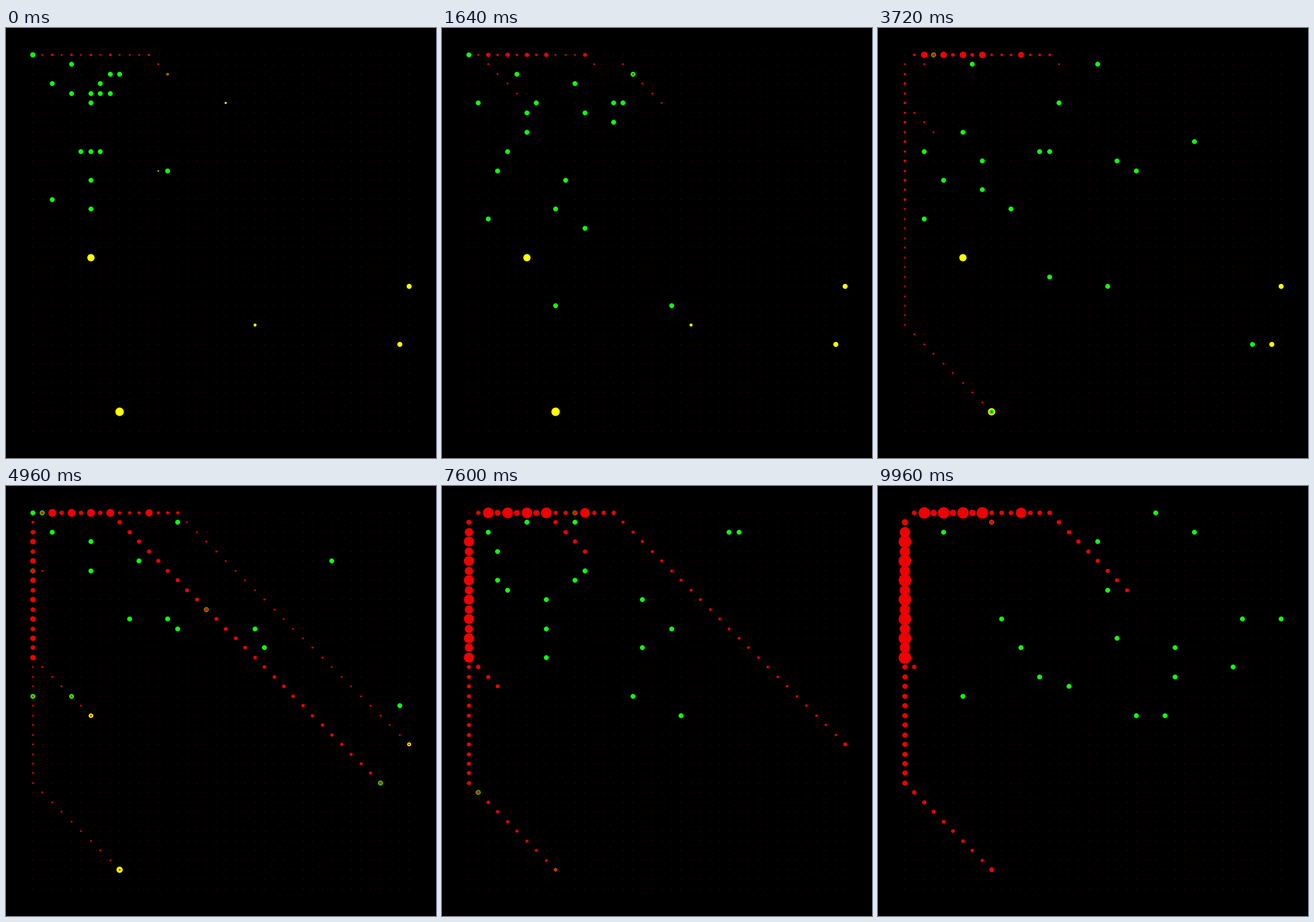
A matplotlib script that plays this animation: 600x600 px, repeating every 10 s.

```python
import matplotlib.pyplot as plt
import numpy as np
from matplotlib.animation import FuncAnimation

SIZE, DPI = 600, 100
N = 40                      # cells per side
FRAMES, INTERVAL = 250, 40
SPEED = 2                   # cells per frame for ants on an errand
LEAD = 8                    # frames an ant needs to reach its food
ANT_SIZE = 6.8
THIN = 2.6                  # diameter of a fresh trail
NEST = np.array([0, 0])
DRIFT = np.array([0.085, 0.07])

# Ants at the start: row -> columns.
START = {
    0: (0, 0, 0), 1: (4,), 2: (8, 9), 3: (2, 7), 4: (4, 6, 7, 8), 5: (6,),
    10: (5, 6, 7), 12: (14,), 13: (6,), 15: (2,), 16: (6,),
}

# Cell, diameter, first and last pick-up, trips,
# then the frames when the trail gets thick and when it starts to fade.
FOOD = [
    ((6, 21), 10.2, 98, 140, 5, 125, 170),
    ((39, 24), 7, 103, 158, 3, 175, 212),
    ((38, 30), 7, 96, 122, 3, 95, 122),
    ((9, 37), 11.8, 49, 212, 8, 170, FRAMES),
    ((23, 28), 4.2, 44, 45, 1, FRAMES, 20),
    ((20, 5), 3, 38, 39, 1, FRAMES, 40),
    ((14, 2), 4.4, -5, 8, 0, FRAMES, 5),
    ((13, 12), 2, 12, 13, 0, FRAMES, 0),
]

rng = np.random.default_rng(11)


def ramp(t, start, length):
    return float(np.clip((t - start) / length, 0, 1))


def simulate():
    """Cells of all ants in every frame."""
    ants = np.array([(c, r) for r, cols in START.items() for c in cols])
    routes = [[] for _ in ants]
    errands = [(int(t) - LEAD, cell)
               for cell, _, first, last, trips, *_ in FOOD
               for t in np.linspace(first, last, trips)]
    history = [ants.copy()]
    for frame in range(1, FRAMES):
        for cell in [c for t, c in errands if t == frame]:
            free = [i for i, route in enumerate(routes) if not route]
            best = min(free, key=lambda i: np.abs(ants[i] - cell).max())
            routes[best] = [np.array(cell), NEST]
        steps = np.floor(rng.random(ants.shape) * 3 - 1 + 1.5 * DRIFT)
        for i, route in enumerate(routes):
            if route:
                # Diagonal until level with the goal, then straight.
                ants[i] += np.clip(route[0] - ants[i], -SPEED, SPEED)
                if (ants[i] == route[0]).all():
                    route.pop(0)
            else:
                ants[i] = np.clip(ants[i] + steps[i], 0, N - 1)
        history.append(ants.copy())
    return history


def food_size(frame, food):
    _, size, first, last, *_ = food
    return size * np.sqrt(1 - ramp(frame, first, last - first))


def trail_width(frame, surge):
    return THIN + 3.6 * ramp(frame, surge, 30)


def add_trail(field, frame, food):
    """Diagonal from the food to the wall, fading from its far end."""
    (col, row), _, first, last, trips, surge, fade = food
    length = min(col, row)
    reach = length * np.exp(-max(frame - fade, 0) / 35)
    near = trail_width(frame, surge)
    for k in range(length):
        i = length - 1 - k
        if i + 0.5 < reach and frame >= first + k / SPEED:
            width = near + (THIN - near) * 0.6 * i / length
            if k == 0 and frame >= last and trips > 1:
                width *= 1.6
            cell = col - k, row - k
            field[cell] = max(field[cell], width)


def add_walls(field, frame):
    """Shared paths along the top and left walls."""
    top = 0.23 + 0.77 * ramp(frame, 0, 210)
    for c in range(1, 16):
        if c > 12 and frame < 80:
            continue
        full = (16 if c % 2 == 0 else 9) if 1 < c < 9 else 6.5
        full += 8 * (c == 12)
        field[c, 0] = max(THIN, full * top)

    side = np.interp(frame, [60, 93, 161, 249], [0.16, 0.22, 0.7, 1])
    for r in range(1, 29):
        if frame < 54 + (28 - r) / SPEED:
            continue
        if r < 16:
            full = 17.5 if r % 2 else 14.5
            field[0, r] = max(THIN, full * side * (0.5 if r == 1 else 1))
        else:
            field[0, r] = 1.3 * trail_width(frame, 170) - 0.8


def pheromone(frame):
    """Marker diameters, indexed by column and row."""
    field = np.zeros((N, N))
    add_walls(field, frame)
    for food in FOOD:
        add_trail(field, frame, food)
    return field


def to_px(cells):
    return 37.5 + np.asarray(cells) * 525 / (N - 1)


def snap(cells):
    return np.floor(to_px(cells)) + 0.5


def area(diameter):
    """Scatter size for a diameter in pixels."""
    return (np.asarray(diameter) * 72 / DPI) ** 2


fig = plt.figure(figsize=(SIZE / DPI, SIZE / DPI), dpi=DPI, facecolor="black")
ax = fig.add_axes([0, 0, 1, 1])
ax.set(xlim=(0, SIZE), ylim=(SIZE, 0))
ax.axis("off")


def dots(points, color, size, z):
    x, y = points.T
    return ax.scatter(x, y, s=np.full(len(x), area(size)), c=color,
                      linewidths=0, zorder=z)


paths = simulate()
grid = np.array([(c, r) for c in range(N) for r in range(N)])
dots(to_px(grid), "#f00000", 0.75, 0)
food_dots = dots(snap([food[0] for food in FOOD]), "#ffff00", 5, 1)
ant_dots = dots(snap(paths[0]), "#10ff10", ANT_SIZE, 2)
trail_dots = dots(snap(grid), "#f00000", 0, 3)


def update(frame):
    food_dots.set_sizes(area([food_size(frame, food) for food in FOOD]))
    ant_dots.set_offsets(snap(paths[frame]))
    trail_dots.set_sizes(area(pheromone(frame).ravel()))
    return food_dots, ant_dots, trail_dots


anim = FuncAnimation(fig, update, frames=FRAMES, interval=INTERVAL,
                     repeat=True, repeat_delay=0)
plt.show()
```
